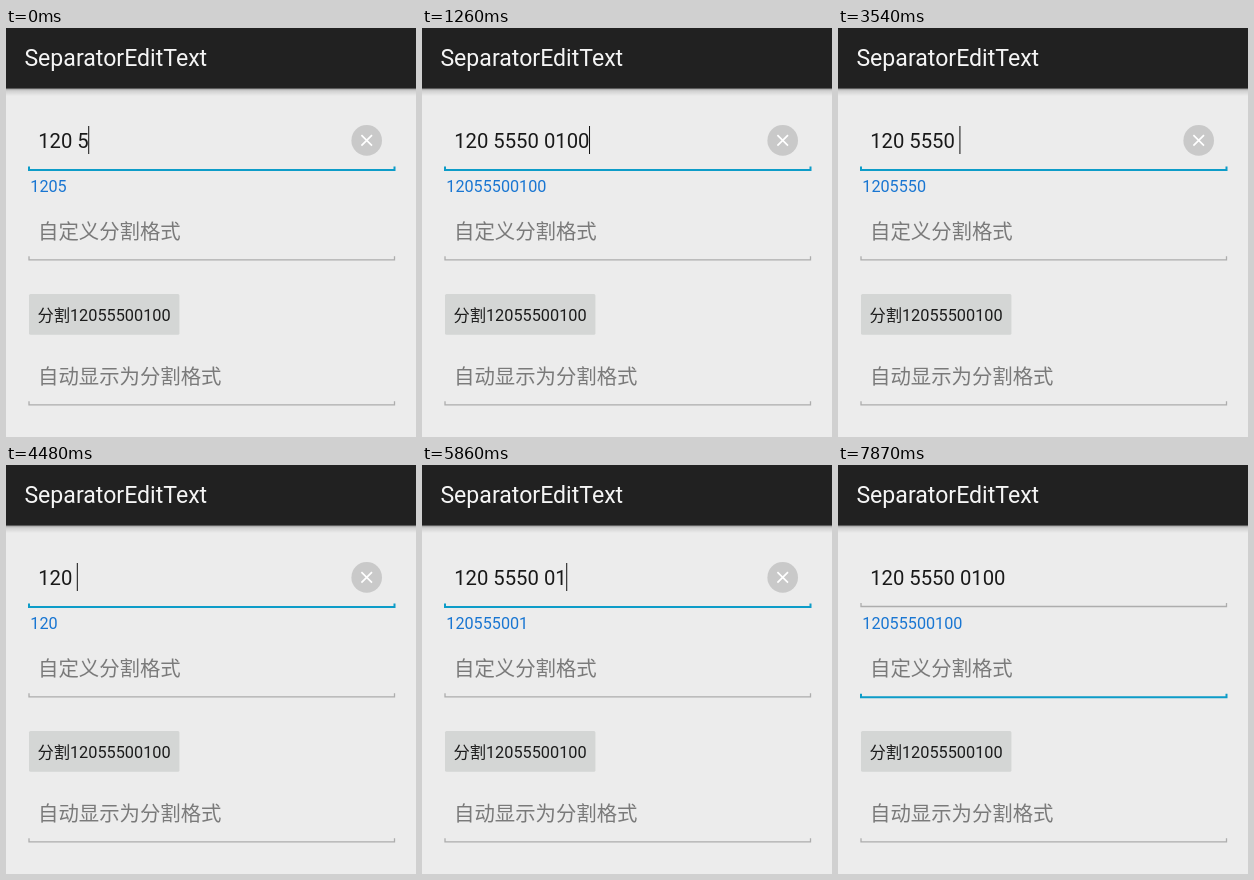
An HTML page that plays this animation: 410 by 409 pixels, repeating every 8000 ms.

```html
<!DOCTYPE html>
<html lang="zh-CN">
<head>
<meta charset="utf-8">
<title>SeparatorEditText</title>
<style>
  html, body { margin: 0; width: 100%; height: 100%; overflow: hidden; background: #ececec; }
  svg { display: block; width: 100%; height: 100%; }
  text { font-family: Roboto, "Noto Sans CJK SC", "Noto Sans CJK", sans-serif; white-space: pre; }
  .title { font-size: 23.1px; fill: #f5f5f5; }
  .field { font-size: 20.25px; fill: #191919; }
  .hint { font-size: 20.4px; fill: #7a7a7a; }
  .raw { font-size: 16.2px; fill: #1976d2; }
  .label { font-size: 16.3px; fill: #1c1c1c; }
  .line { fill: none; stroke: #adadad; stroke-width: 1.3; }
  .line.focus { stroke: #0d9cc8; stroke-width: 2; transform: translateY(.5px); }
</style>
</head>
<body>
<svg viewBox="0 0 410 409">
  <defs>
    <linearGradient id="shade" x2="0" y2="1">
      <stop offset="0" stop-color="#000" stop-opacity=".4"/>
      <stop offset=".35" stop-color="#000" stop-opacity=".12"/>
      <stop offset="1" stop-color="#000" stop-opacity="0"/>
    </linearGradient>
  </defs>
  <rect width="410" height="409" fill="#ececec"/>
  <rect y="60" width="410" height="8" fill="url(#shade)"/>
  <rect width="410" height="60.5" fill="#212121"/>
  <text class="title" x="18.4" y="38">SeparatorEditText</text>

  <text class="field" id="typed" x="32.2" y="120.4"></text>
  <rect id="caret" y="98" width="1" height="28" fill="#111"/>
  <g id="clear">
    <circle cx="360.7" cy="112.4" r="15.3" fill="#c9c9c9"/>
    <path d="M355.4 107.1l10.6 10.6m0 -10.6l-10.6 10.6" stroke="#fff" stroke-width="1.7"/>
  </g>
  <path class="line" id="line1" d="M23 138v3.5h365.5v-3.5"/>
  <text class="raw" id="raw" x="24.3" y="164.3"></text>

  <text class="hint" x="32" y="210.5">自定义分割格式</text>
  <path class="line" id="line2" d="M23 228.3v3.5h365.5v-3.5"/>

  <rect x="23" y="266" width="150.4" height="40.7" rx="1.5" fill="#d4d6d5"/>
  <text class="label" id="label" x="98" y="292.5" text-anchor="middle"></text>

  <text class="hint" x="32" y="355.5">自动显示为分割格式</text>
  <path class="line" d="M23 373.3v3.5h365.5v-3.5"/>

  <path id="pointer" d="M.5 .5v15.8l3.7-3.4 2.5 5.7 2.5-1.1-2.5-5.5h5z"
        fill="#f4f4f4" stroke="#1c1c34"/>
</svg>
<script>
  const LOOP = 8000;
  const NUMBER = '12055500100';
  const DIGIT = 11.4, SPACE = 5.01;
  const FIRST_COUNT = 4;

  // Bursts of key presses: start ms, ms between keys, keys (negative deletes)
  const bursts = [
    [150, 120, 2], [550, 143, 4], [1260, 140, 1],
    [3000, 140, -1], [3300, 120, -3], [3810, 185, -3], [4480, 140, -1],
    [5070, 158, 6], [6110, 140, 2]
  ];
  const caretOff = [[2130, 2720], [4910, 5070], [6680, LOOP]];
  const mouse = { start: 6820, step: 145, nudge: 7420, end: 7870 };
  const FOCUS_MOVE = 7570;

  const el = id => document.getElementById(id);
  const show = (node, on) => node.setAttribute('visibility', on ? 'visible' : 'hidden');
  const clamp = (v, lo, hi) => Math.min(hi, Math.max(lo, v));
  const within = (t, from, to) => t >= from && t < to;

  function countAt(t) {
    return bursts.reduce((n, [start, gap, keys]) => {
      const pressed = clamp(Math.floor((t - start) / gap) + 1, 0, Math.abs(keys));
      return n + Math.sign(keys) * pressed;
    }, FIRST_COUNT);
  }

  function split(digits) {
    return [...digits].map((c, i) => c + (i === 2 || i === 6 ? ' ' : '')).join('');
  }

  // The pointer rises in steps, slowing down, then dips once.
  function pointerAt(t) {
    const left = 1 - clamp(Math.floor((t - mouse.start) / mouse.step), 0, 2) / 2;
    const dip = t >= mouse.nudge ? 18 : 0;
    return [204 - 3 * left, 211 + 126 * left * left + dip];
  }

  function draw(t) {
    const count = countAt(t);
    const digits = NUMBER.slice(0, count);
    const text = split(digits);
    el('typed').textContent = text;
    el('raw').textContent = digits;
    el('caret').setAttribute('x', 31.6 + count * DIGIT + (text.length - count) * SPACE);
    show(el('caret'), !caretOff.some(([from, to]) => within(t, from, to)));

    const moved = t >= FOCUS_MOVE;
    show(el('clear'), !moved);
    el('line1').classList.toggle('focus', !moved);
    el('line2').classList.toggle('focus', moved);

    show(el('pointer'), within(t, mouse.start, mouse.end));
    el('pointer').setAttribute('transform', `translate(${pointerAt(t)})`);
  }

  function tick() {
    draw(performance.now() % LOOP);
    requestAnimationFrame(tick);
  }

  el('label').textContent = '分割' + NUMBER;
  tick();
</script>
</body>
</html>
```
